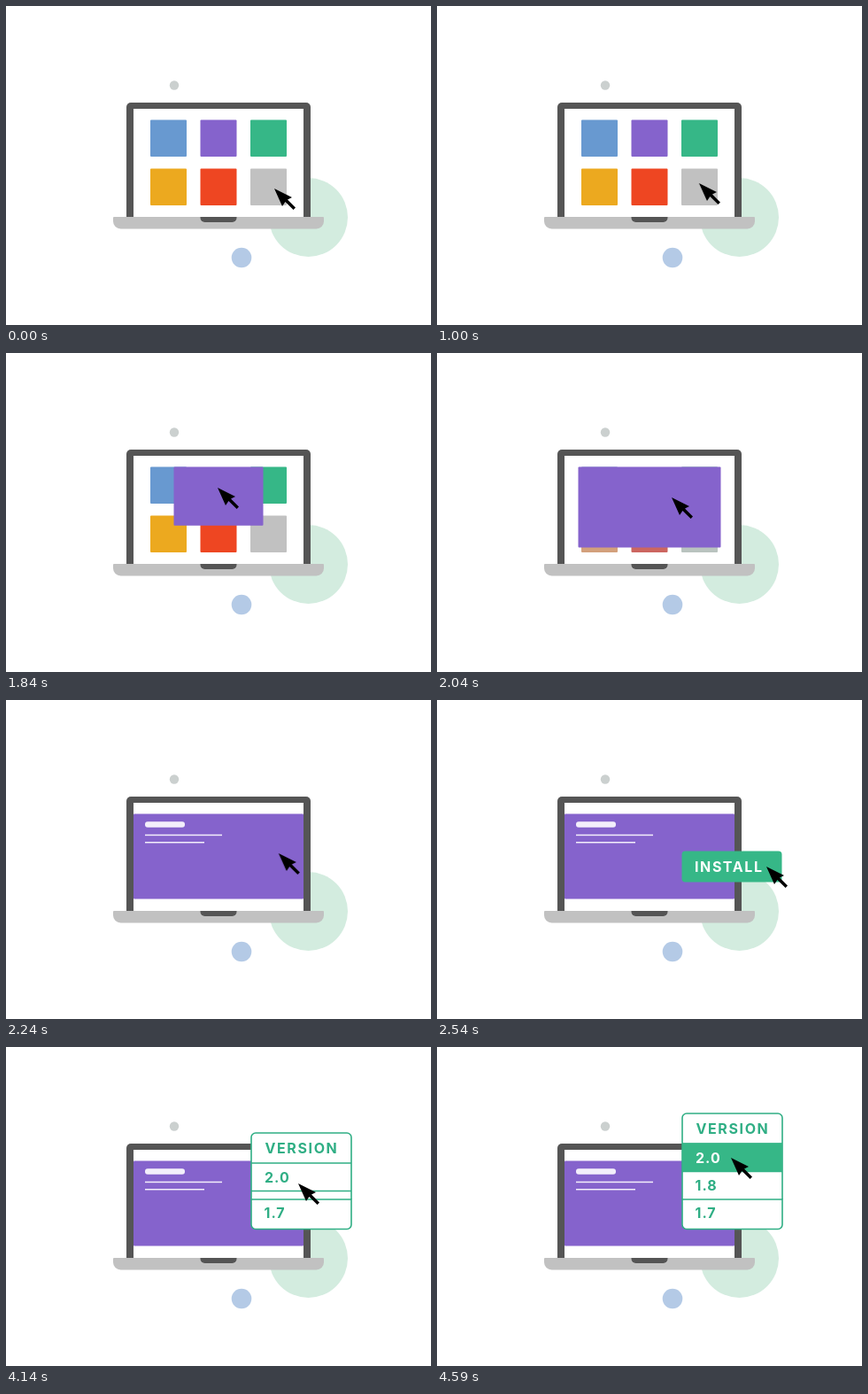
Write an HTML page without scripts that moves like this. It is 480 px wide and 360 px high and loops after 5.09 s.

```html
<!DOCTYPE html>
<html lang="en">
<head>
<meta charset="utf-8">
<title>Install a version</title>
<style>
  html, body { margin: 0; width: 100%; height: 100%; overflow: hidden; background: #fff; }
  svg { display: block; width: 100vw; height: 100vh; }
  text { font: 700 16px Inter, "Open Sans", sans-serif; letter-spacing: 1px; fill: currentColor; }
  .caps { letter-spacing: 1.6px; }

  .tiles, .tiles rect, .panel, .copy, .button, .menu, .stack, .mark, .pick, .cursor {
    animation: 5.09s step-end infinite;
  }

  /* home screen */
  .tiles { animation-name: tiles; }
  .tiles rect { width: 41px; height: 41.5px; rx: 1px; animation-name: mute; }
  @keyframes tiles { 42.04%, 100% { visibility: hidden; } }
  @keyframes mute { 40.07%, 100% { fill: var(--muted); } }

  /* purple tile opens into a page */
  .panel { fill: #8563cc; animation-name: open; }
  @keyframes open {
    0%     { x: 219.5px; y: 128.5px; width: 41px; height: 41.5px; }
    34.18% { x: 219.5px; y: 128.5px; width: 41px; height: 41.5px; animation-timing-function: steps(4, start); }
    42.03% { x: 159.5px; y: 128.5px; width: 161px; height: 91px; }
    42.04%, 100% { x: 144px; y: 128.5px; width: 192px; height: 96px; }
  }
  .copy { visibility: hidden; animation-name: copy; }
  @keyframes copy { 44%, 100% { visibility: visible; } }

  .button { color: #fff; transform-origin: 333px 188px; animation-name: pop; }
  @keyframes pop {
    0%     { transform: scale(0); }
    45.97% { transform: scale(.5); }
    47.93% { transform: scale(.85); }
    49.9%  { transform: scale(1); }
    69.54%, 100% { transform: scale(0); }
  }

  /* version menu slides up from behind its last row */
  .menu { color: #2fae84; stroke: none; animation-name: menu; }
  @keyframes menu {
    0%     { visibility: hidden; }
    69.54% { visibility: visible; color: #507f8e; }
    72.49%, 100% { visibility: visible; color: #2fae84; }
  }
  .line { fill: none; stroke: currentColor; stroke-width: 1.6; }
  .stack { animation-name: rise; }
  @keyframes rise {
    0%     { transform: translateY(100px); }
    72.49% { transform: translateY(75px); }
    75.44% { transform: translateY(55px); }
    78.38% { transform: translateY(37px); }
    81.33% { transform: translateY(22px); }
    84.28% { transform: translateY(9px); }
    87.22%, 100% { transform: translateY(0); }
  }
  .mark { fill: #36b787; opacity: 0; animation-name: mark; }
  @keyframes mark { 90.17%, 100% { opacity: 1; } }
  .pick { animation-name: pick; }
  @keyframes pick { 90.17%, 100% { fill: #fff; } }

  .cursor { animation-name: travel; }
  @keyframes travel {
    0%     { transform: translate(303px, 206px); }
    19.64% { transform: translate(303px, 206px); animation-timing-function: steps(9, start); }
    24.94% { transform: translate(239px, 152px); }
    38.11% { transform: translate(239px, 152px); animation-timing-function: steps(2, start); }
    42.04% { transform: translate(265px, 163px); animation-timing-function: steps(5, start); }
    51.86% { transform: translate(372px, 188px); }
    72.49% { transform: translate(372px, 188px); animation-timing-function: steps(4, start); }
    84.28% { transform: translate(330px, 154px); animation-timing-function: steps(3, start); }
    93.12%, 100% { transform: translate(332px, 125px); }
  }
</style>
</head>
<body>
<svg viewBox="0 0 480 360">
  <defs>
    <clipPath id="above"><path d="M270 60H396V172H270Z"/></clipPath>
  </defs>

  <circle cx="190" cy="89.5" r="5.2" fill="#cbd0cf"/>
  <circle cx="341.5" cy="238.5" r="44.5" fill="#d3ecdf"/>
  <circle cx="266" cy="284" r="11.3" fill="#b4cae6"/>

  <!-- laptop -->
  <path d="M136 240V114a5 5 0 0 1 5-5H339a5 5 0 0 1 5 5V240Z" fill="#555"/>
  <path d="M144 116H336V239H144Z" fill="#fff"/>
  <path d="M122 238H358q1 0 1 1v4a8.500 8.500 0 0 1-8.500 8.500H129.500a8.500 8.500 0 0 1-8.500-8.500v-4q0-1 1-1Z" fill="#c1c1c1"/>
  <path d="M219.500 238H260.500V239a5 5 0 0 1-5 5H224.500a5 5 0 0 1-5-5Z" fill="#555"/>

  <g class="tiles">
    <rect x="163" y="128.5" fill="#6899d0" style="--muted:#7c9cc4"/>
    <rect x="276" y="128.5" fill="#36b787" style="--muted:#6fb59a"/>
    <rect x="163" y="183.5" fill="#eca91f" style="--muted:#d3a07c"/>
    <rect x="219.5" y="183.5" fill="#ee4622" style="--muted:#cc6660"/>
    <rect x="276" y="183.5" fill="#c1c1c1" style="--muted:#b9c3bf"/>
  </g>

  <rect class="panel" rx="1"/>
  <g class="copy" fill="#f3effb">
    <rect x="157" y="137.200" width="45" height="6.500" rx="3"/>
    <rect x="157" y="151.700" width="87" height="1.500"/>
    <rect x="157" y="160" width="67" height="1.500"/>
  </g>

  <g class="button">
    <rect x="276.500" y="170.500" width="113" height="35" rx="4" fill="#36b787"/>
    <text class="caps" x="291" y="194">INSTALL</text>
  </g>

  <g class="menu">
    <g clip-path="url(#above)">
      <g class="stack">
        <path class="line" style="fill:#fff" d="M277 280V80a5 5 0 0 1 5-5H385a5 5 0 0 1 5 5V280"/>
        <path class="line" d="M277 109H390M277 140.500H390"/>
        <rect class="mark" x="277" y="108.500" width="113" height="32"/>
        <text class="caps" x="292.500" y="98">VERSION</text>
        <text class="pick" x="292" y="130.500">2.0</text>
        <text x="291.500" y="161.500">1.8</text>
      </g>
    </g>
    <path class="line" style="fill:#fff" d="M277 172H390V200.500a5 5 0 0 1-5 5H282a5 5 0 0 1-5-5Z"/>
    <text x="291.500" y="192.700">1.7</text>
  </g>

  <path class="cursor" d="M0 0 20 10 15 12.400 24 21.600 21.600 24 12.400 15 9 20Z"/>
</svg>
</body>
</html>
```
